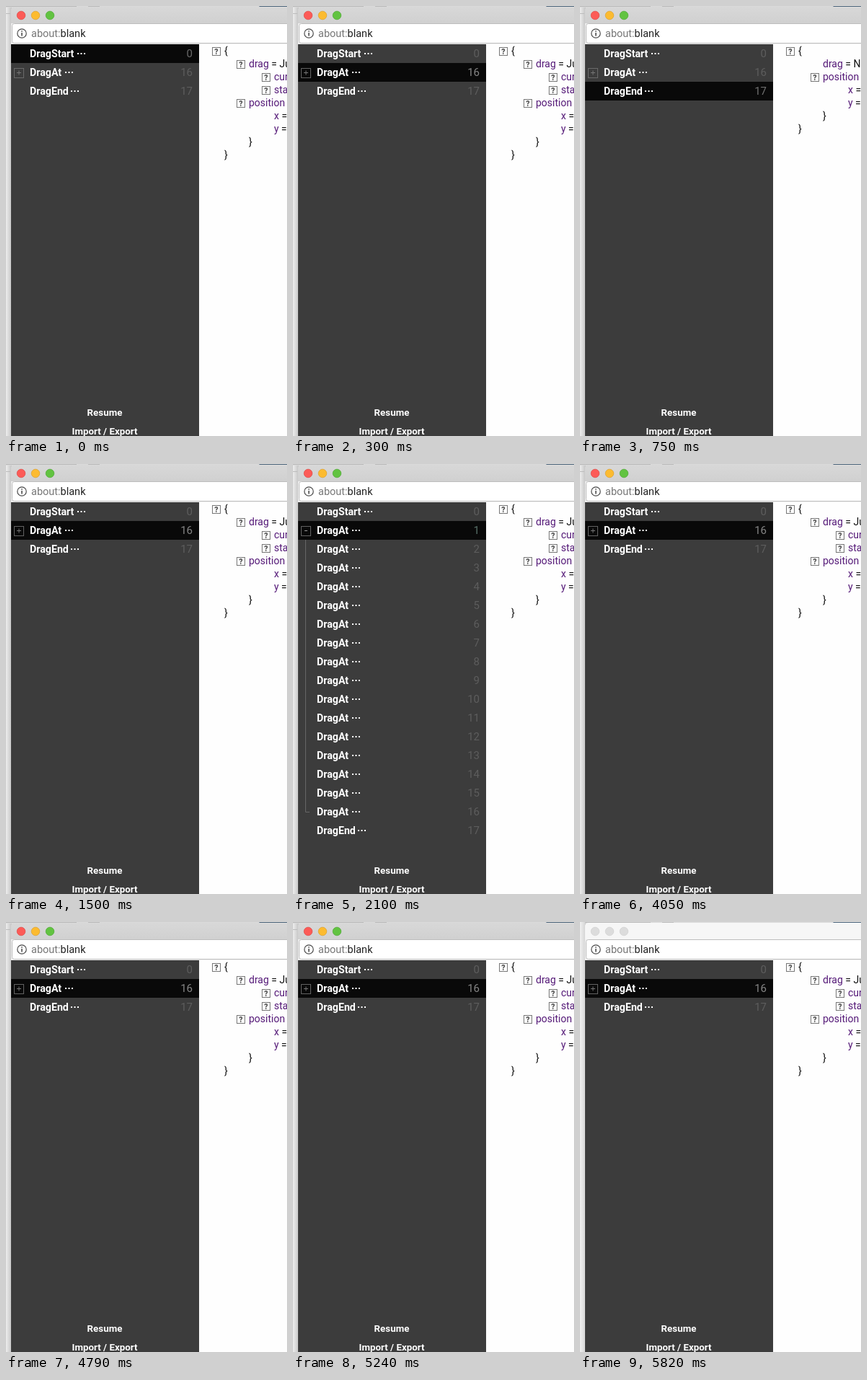
An HTML page for the animation above (5.92 s loop, 390 px wide and 596 px high).

```html
<!DOCTYPE html>
<html lang="en">
<head>
<meta charset="utf-8">
<title>Event log</title>
<style>
  html, body { margin: 0; width: 100%; height: 100%; overflow: hidden; background: #fff; }
  svg { display: block; width: 390px; height: 596px; font-family: Roboto, "Noto Sans", sans-serif; }
  text { white-space: pre; }
  .label { font-size: 14.2px; font-weight: 600; fill: #fff; }
  .count { font-size: 15px; text-anchor: end; fill: #5d5d5d; }
  .button { font-size: 13.33px; font-weight: 600; fill: #fff; text-anchor: middle; }
  .code { font-size: 14px; fill: #111; }
  .key { fill: #551a78; }
  .mark { font-size: 10.5px; font-weight: 800; fill: #555; text-anchor: middle; }

  .scene { opacity: 0; animation: 5920ms step-end infinite; }
  #first { animation-name: first; }
  #group { animation-name: group; }
  #last { animation-name: last; }
  #open { animation-name: open; }
  #dragging { animation-name: dragging; }
  #released { animation-name: last; }
  #blurred { animation-name: blurred; }
  @keyframes first { 0% { opacity: 1 } 5.0676%, 100% { opacity: 0 } }
  @keyframes group {
    0%, 12.6689%, 35.473% { opacity: 0 }
    5.0676%, 25.3378%, 68.4122%, 100% { opacity: 1 }
  }
  @keyframes last { 0%, 25.3378%, 100% { opacity: 0 } 12.6689% { opacity: 1 } }
  @keyframes open { 0%, 68.4122%, 100% { opacity: 0 } 35.473% { opacity: 1 } }
  @keyframes dragging { 0%, 25.3378%, 100% { opacity: 1 } 12.6689% { opacity: 0 } }
  @keyframes blurred { 0% { opacity: 0 } 98.3108%, 100% { opacity: 1 } }
</style>
</head>
<body>
<svg viewBox="0 0 390 596">
  <defs>
    <linearGradient id="shade">
      <stop offset="0" stop-color="#ededed"/><stop offset="1" stop-color="#c3c3c3"/>
    </linearGradient>
    <linearGradient id="paleShade">
      <stop offset="0" stop-color="#f0f0f0"/><stop offset="1" stop-color="#d6d6d6"/>
    </linearGradient>
    <linearGradient id="bar" x2="0" y2="1">
      <stop offset="0" stop-color="#d8d8d8"/><stop offset="1" stop-color="#d0d0d0"/>
    </linearGradient>
  </defs>

  <rect width="390" height="596" fill="#fefefe"/>
  <rect width="8" height="596" fill="url(#shade)"/>
  <rect width="390" height="2" fill="#d9d9d9"/>
  <path d="M0 .5H98M114 .5H130" stroke="#b9b9b9"/>
  <path d="M351 0H390V2H353Z" fill="#4c657c"/>
  <path d="M0 10.5H6" stroke="#bcbcbc"/>

  <path d="M7 25V6Q7 1 12 1H390V25Z" fill="url(#bar)"/>
  <g stroke-width=".7">
    <circle cx="21" cy="13" r="5.8" fill="#fc5b57" stroke="#df4744"/>
    <circle cx="41" cy="13" r="5.8" fill="#fcbb30" stroke="#dda02c"/>
    <circle cx="61" cy="13" r="5.8" fill="#62c341" stroke="#4ba832"/>
  </g>

  <g id="blurred" class="scene">
    <rect width="7" height="596" fill="url(#paleShade)"/>
    <path d="M7 25V6Q7 1 12 1H390V25Z" fill="#f6f6f6"/>
    <g fill="#dcdcdc" stroke="#d0d0d0" stroke-width=".7">
      <circle cx="21" cy="13" r="5.8"/><circle cx="41" cy="13" r="5.8"/><circle cx="61" cy="13" r="5.8"/>
    </g>
  </g>

  <rect x="7" y="24" width="383" height="29" fill="#f1f1f1"/>
  <rect x="8.5" y="24.5" width="390" height="27" rx="3" fill="#fff" stroke="#bdbdbd"/>
  <circle cx="22" cy="38" r="6.2" fill="none" stroke="#4a4a4a" stroke-width="1.2"/>
  <path d="M22 37V41.5M22 34.2V35.8" stroke="#4a4a4a" stroke-width="1.6"/>
  <text x="35" y="43" font-size="14.5" fill="#777">about:<tspan fill="#222">blank</tspan></text>

  <rect x="7" y="53" width="261" height="543" fill="#3c3c3c"/>
  <g id="scenes"></g>
  <text class="button" x="137" y="568">Resume</text>
  <text class="button" x="137" y="594">Import / Export</text>
</svg>
<script>
  const scenes = document.getElementById("scenes");
  const dotsAt = { DragStart: 99, DragAt: 82, DragEnd: 90 };

  const group = (id, body) => `<g id="${id}" class="scene">${body}</g>`;

  function row([name, count], i, selected, tint) {
    const top = 53 + 26 * i, x = dotsAt[name], on = i === selected;
    const dots = [0, 4.5, 9].map(d =>
      `<rect x="${x + d}" y="${top + 12}" width="2" height="2" fill="#fff"/>`).join("");
    return (on ? `<rect x="7" y="${top}" width="261" height="26" fill="#090909"/>` : "") +
      `<text class="label" x="33" y="${top + 18}">${name}</text>${dots}` +
      `<text class="count" x="259" y="${top + 18.3}"${on ? ` style="fill:${tint}"` : ""}>${count}</text>`;
  }

  function list(id, rows, selected, tint, expanded) {
    const sign = expanded ? "M16 92.5H20" : "M15 92.5H21M18 89.5V95.5";
    const stem = expanded ? `<path d="M17.5 105V482.5H23" stroke="#666" fill="none"/>` : "";
    const color = selected === 1 ? "#626262" : "#6a6a6a";
    return group(id, rows.map((r, i) => row(r, i, selected, tint)).join("") +
      `<rect x="11.5" y="86.5" width="13" height="13" fill="none" stroke="${color}"/>` +
      `<path d="${sign}" stroke="${expanded ? "#999" : "#777"}"/>` + stem);
  }

  // Each line: x, optional key, remaining text, whether it has a marker box.
  function panel(id, lines) {
    return group(id, lines.map(([x, key, rest, marked], i) => {
      const y = 62 + 18 * i;
      const box = marked
        ? `<rect x="${x - 16.5}" y="${y - 4.5}" width="11" height="11" fill="#fff" stroke="#777"/>` +
          `<text class="mark" x="${x - 11}" y="${y + 4.8}">?</text>` : "";
      return `${box}<text class="code" x="${x}" y="${y + 5}"><tspan class="key">${key}</tspan>${rest}</text>`;
    }).join(""));
  }

  const start = ["DragStart", 0], end = ["DragEnd", 17];
  const folded = [start, ["DragAt", 16], end];
  const moves = Array.from({ length: 16 }, (_, i) => ["DragAt", i + 1]);
  const head = [303, "", "{", true];
  const tail = [
    [337, "position", " = {", true],
    [372, "x", " = 1"], [372, "y", " = 1"],
    [337, "", "}"], [303, "", "}"]
  ];

  scenes.innerHTML =
    list("first", folded, 0, "#696969") +
    list("group", folded, 1, "#858585") +
    list("last", folded, 2, "#707070") +
    list("open", [start, ...moves, end], 1, "#587068", true) +
    panel("dragging", [head, [337, "drag", " = Just {", true],
      [372, "current", " = {", true], [372, "start", " = {", true], ...tail]) +
    panel("released", [head, [337, "drag", " = Nothing"], ...tail]);
</script>
</body>
</html>
```
